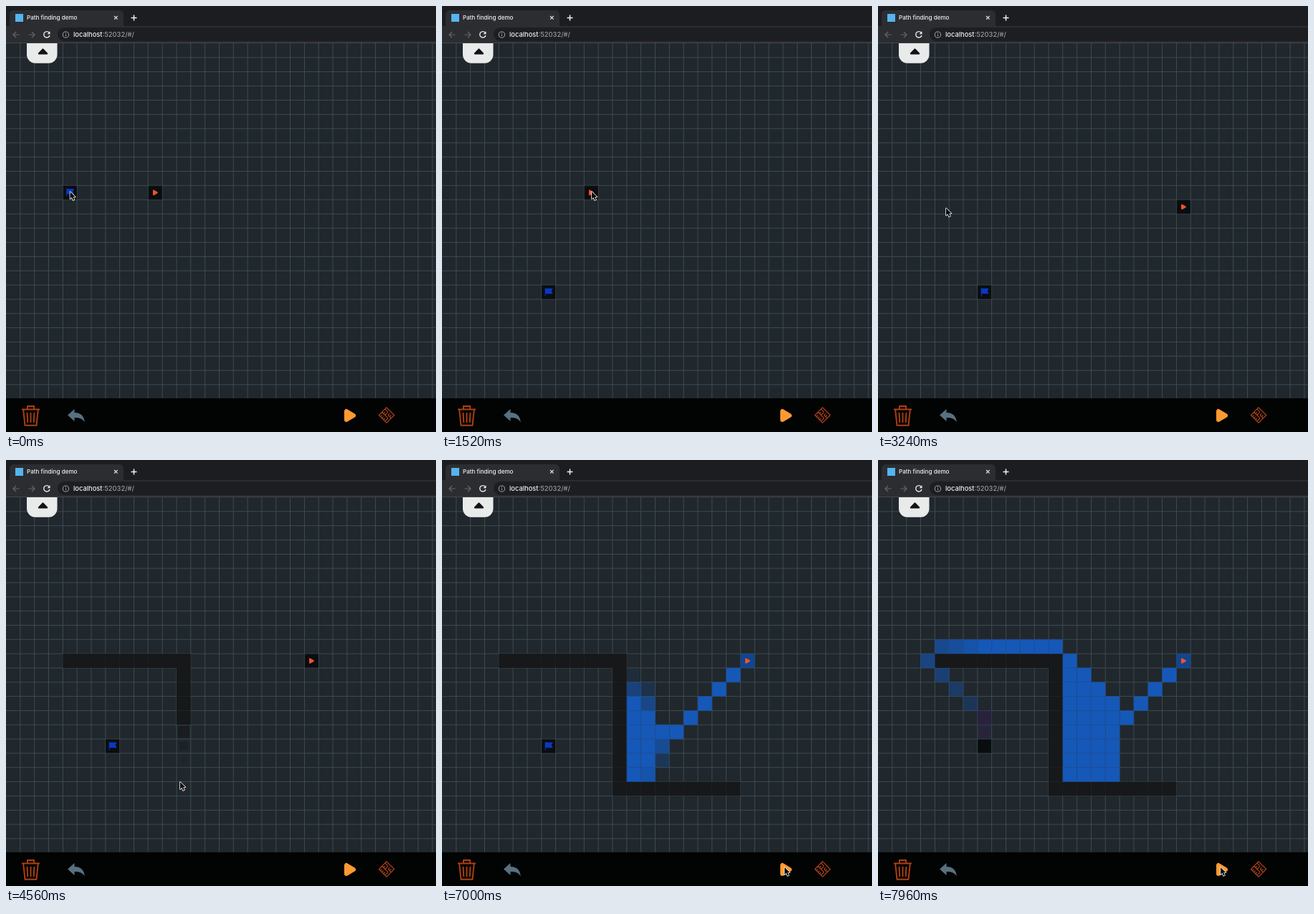
Animation of 600x594 px, one loop 8 s. Source, as an HTML page with a canvas:

```html
<!DOCTYPE html>
<html lang="en">
<head>
<meta charset="utf-8">
<title>Path finding demo</title>
<style>
html, body { margin: 0; width: 100%; height: 100%; overflow: hidden; background: #000; }
canvas { display: block; }
</style>
</head>
<body>
<canvas id="stage" width="600" height="594"></canvas>
<script>
const ctx = document.getElementById('stage').getContext('2d');
const LOOP = 8000, CELL = 19.83, TOP = 52, BOTTOM = 547;
const DRAW_FROM = 3400, DRAW_TO = 5200, GOAL_REACHED = 7950;
const BLUE = '#1558b8', PURPLE = '#2c2142';
const clamp = (v, low = 0, high = 1) => Math.max(low, Math.min(high, v));
const smooth = p => p * p * (3 - 2 * p);

// Pointer moves: begin, end, x, y. It rests in between.
const home = [89.5, 259];
const moves = [
  [40, 800, 149, 398],
  [880, 1500, 209, 259],
  [1680, 2440, 427, 281],
  [2560, 3220, 95, 282],
  [DRAW_FROM, 4000, 243, 281],
  [4000, 4590, 243, 458],
  [4590, DRAW_TO, 408, 458],
  [5360, 5960, 478, 568]
];

function pointer(t) {
  let [x, y] = home;
  for (const [begin, end, toX, toY] of moves) {
    const p = clamp((t - begin) / (end - begin));
    const drawing = begin >= DRAW_FROM && end <= DRAW_TO;
    const k = drawing ? p : smooth(p);
    x += (toX - x) * k;
    y += (toY - y) * k;
  }
  return [x, y];
}

function cellAt(t) {
  const [x, y] = pointer(t);
  return [Math.floor(x / CELL), Math.floor((y - TOP) / CELL)];
}

const dragged = (t, from, to) => cellAt(clamp(t, from, to));

// Each wall appears when the pointer first enters its cell.
const walls = new Map();
for (let t = DRAW_FROM; t <= DRAW_TO; t += 5) {
  const key = cellAt(t).join();
  if (!walls.has(key)) walls.set(key, t);
}

// Search front: straight runs, plus a pocket that fills outwards behind the wall.
const visited = new Map();

function visit(col, row, born, color = BLUE) {
  const key = [col, row].join();
  if (!visited.has(key)) visited.set(key, { cell: [col, row], born, color });
}

function run(col, row, stepX, stepY, count, begin, interval, color) {
  for (let i = 0; i < count; i++) {
    visit(col + i * stepX, row + i * stepY, begin + i * interval, color);
  }
}

run(21, 11, -1, 1, 5, 6290, 33);
run(16, 16, -1, 0, 4, 6455, 33);
for (let col = 13; col <= 16; col++) {
  for (let row = col - 2; row <= 19; row++) {
    const distance = 0.8 * (col - 13) ** 2 + Math.abs(row - 16.8);
    visit(col, row, clamp(6090 + 180 * distance, 6590, 7320));
  }
}
run(12, 10, -1, 0, 9, 7360, 40);
run(3, 11, 1, 1, 4, 7720, 40);
run(7, 15, 0, 1, 2, 7880, 40, PURPLE);

function rect(x, y, w, h, color, radius = 0) {
  ctx.fillStyle = color;
  ctx.beginPath();
  ctx.roundRect(x, y, w, h, radius);
  ctx.fill();
}

function fill(d, color) {
  ctx.fillStyle = color;
  ctx.fill(new Path2D(d));
}

function stroke(d, color, width) {
  ctx.strokeStyle = color;
  ctx.lineWidth = width;
  ctx.stroke(new Path2D(d));
}

// A filled shape whose corners are rounded by its outline.
function soft(d, color, width) {
  ctx.lineJoin = 'round';
  stroke(d, color, width);
  fill(d, color);
  ctx.lineJoin = 'miter';
}

function text(str, x, y, size, color) {
  ctx.font = `500 ${size}px Inter, Roboto, sans-serif`;
  ctx.fillStyle = color;
  ctx.fillText(str, x, y);
  return x + ctx.measureText(str).width;
}

function at(x, y, draw) {
  ctx.save();
  ctx.translate(x, y);
  draw();
  ctx.restore();
}

function drawBrowser() {
  rect(0, 0, 600, 28, '#1c1d20');
  rect(5, 6, 159, 30, '#2c2d31', 6);
  rect(0, 28, 600, 24, '#2c2d31');
  rect(72, 30, 540, 19, '#1d1e22', 9.5);
  rect(0, 51, 600, 1, '#47484b');
  rect(13, 11, 11, 11, '#54b4ee');
  text('Path finding demo', 29, 19.2, 8.1, '#eef0f2');
  stroke('M151 14l4.6 4.6m0-4.6l-4.6 4.6', '#e0e1e4', 1.2);
  stroke('M174.500 16.5h8m-4-4v8'.replace('.500', '.5'), '#f0f0f2', 1.5);
  stroke('M18.5 40H10m4-4l-4 4 4 4M31.5 40H40m-4-4l4 4-4 4', '#66676a', 1.2);
  stroke('M60.3 37.2A4.2 4.2 0 1 0 61 41', '#e8eaed', 1.4);
  fill('M61.5 35.3v4h-4z', '#e8eaed');
  stroke('M87.5 40a4.1 4.1 0 1 1-8.2 0a4.1 4.1 0 1 1 8.2 0M83.4 39.5v2.6m0-4.7v1.1', '#a4a7ac', 1);
  const end = text('localhost', 94, 43.2, 9.3, '#eef0f2');
  text(':52032/#/', end, 43.2, 9.3, '#989b9f');
}

function drawGrid() {
  rect(0, TOP, 600, BOTTOM - TOP, '#20272d');
  let d = '';
  for (let p = CELL; p < 600; p += CELL) {
    d += `M${p} ${TOP}V${BOTTOM}`;
    if (TOP + p < BOTTOM) d += `M0 ${TOP + p}H600`;
  }
  stroke(d, '#3d4c50', 1);
}

function drawCell([col, row], scale, alpha, color, edge) {
  const size = CELL * scale, inset = (CELL - size) / 2;
  const x = col * CELL + inset, y = TOP + row * CELL + inset;
  ctx.globalAlpha = alpha;
  rect(x, y, size, size, color);
  if (edge) {
    ctx.strokeStyle = edge;
    ctx.lineWidth = 0.8;
    ctx.strokeRect(x, y, size, size);
  }
  ctx.globalAlpha = 1;
}

function drawWalls(t) {
  for (const [key, born] of walls) {
    const p = clamp((t - born) / 330);
    if (p > 0) drawCell(key.split(','), p, p * p, '#16181a');
  }
}

function drawVisited(t, start) {
  for (const { cell, born, color } of visited.values()) {
    const p = clamp((t - born) / 400);
    if (p === 0) continue;
    const scale = Math.min(1, 0.6 + p * 2);
    const onStart = cell.join() === start.join();
    const alpha = color === PURPLE ? Math.min(1, 0.6 + p) : onStart ? p * 0.75 : p;
    drawCell(cell, scale, alpha, color, 'rgba(35,70,120,.4)');
  }
}

function atCell([col, row], draw) {
  at((col + 0.5) * CELL, TOP + (row + 0.5) * CELL, draw);
}

function drawMarkers(t) {
  const goal = dragged(t, 40, 840), start = dragged(t, 1680, 2480);
  drawCell(goal, 0.96, 1, '#0a0d0f');
  drawCell(start, 0.96, 1, '#0a0d0f');
  drawVisited(t, start);
  if (t < GOAL_REACHED) {
    atCell(goal, () => fill('M-5-6h1v.8h10l-2 3.6 2 3.8h-10v3.2h-1z', '#0a38c4'));
  }
  atCell(start, () => soft('M-2.3-2.8V2.8L2.6 0z', '#f0532d', 2));
}

// Diamond of maze walls: every node sends one wall right or down.
function drawMaze() {
  const count = 5, pitch = 3;
  const half = count * pitch / 2;
  let d = `M${-half} ${-half}h${2 * half}v${2 * half}h${-2 * half}z`;
  for (let i = 0; i < count; i++) {
    for (let j = 0; j < count; j++) {
      const right = Math.sin(i * 12.9 + j * 78.2) > 0;
      d += `M${i * pitch - half} ${j * pitch - half}${right ? 'h' : 'v'}${pitch}`;
    }
  }
  ctx.rotate(Math.PI / 4);
  stroke(d, '#a9421b', 1.3);
}

function drawControls() {
  rect(29, TOP, 42.5, 27.7, '#e9eaea', [0, 0, 12, 12]);
  soft('M51.5 60.5L57 66.3H46z', '#111416', 2.4);
  rect(0, BOTTOM, 600, 594 - BOTTOM, '#020303');

  // Bin
  stroke('M22 562.500h25M30 562v-4h9v4M24.2 563l2.3 21.7h16l2.3-21.7M29.5 567l.8 14M34.5 567v14M39.5 567l-.8 14'.replace('.500', '.5'), '#ad4011', 1.9);
  // Undo
  fill('M86 570.5l9.5-8.5v5c9 0 13.5 5 14.3 13.5c-3-5-7-6.5-14.3-6.5v5z', '#587180');
  // Play
  soft('M475 565V577L485 571z', '#ff9a31', 6);
  at(531, 570.5, drawMaze);
}

function drawPointer(t) {
  at(...pointer(t), () => {
    const arrow = 'M0 0v10l2.3-2.2 1.8 4 1.8-.8-1.7-3.8h3.2z';
    soft(arrow, '#f4f4f4', 1.6);
    fill(arrow, '#090909');
  });
}

function frame(t) {
  drawBrowser();
  drawGrid();
  drawWalls(t);
  drawMarkers(t);
  drawControls();
  drawPointer(t);
}

let began;
function tick(now) {
  began ??= now;
  frame((now - began) % LOOP);
  requestAnimationFrame(tick);
}
requestAnimationFrame(tick);
</script>
</body>
</html>
```
